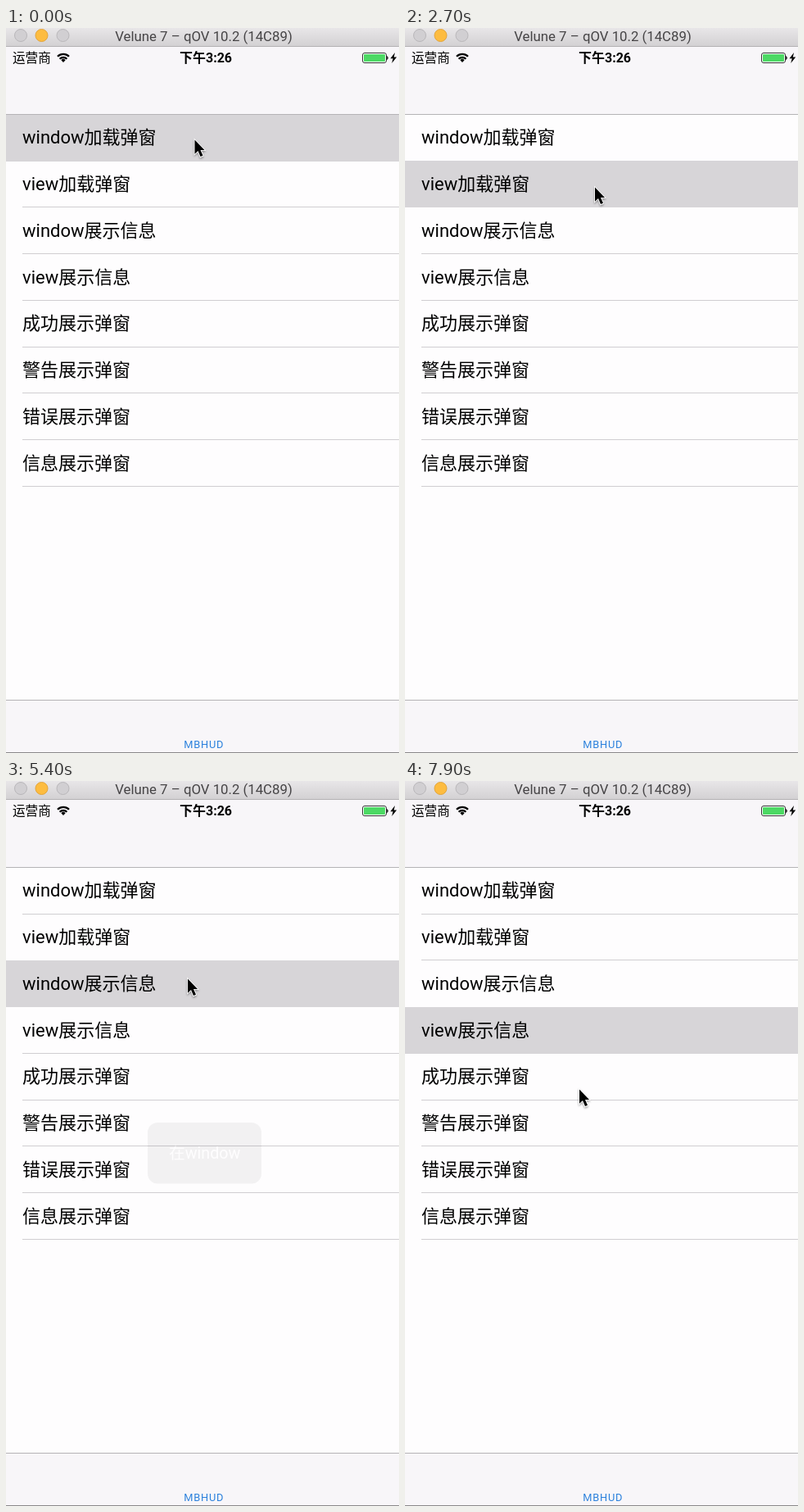
An HTML page that plays this animation: 480x885 px, repeating every 8000 ms.

```html
<!DOCTYPE html>
<html lang="zh-CN">
<head>
<meta charset="utf-8">
<title>HUD demo</title>
<style>
  html, body { margin: 0; width: 100%; height: 100%; overflow: hidden; background: #fefdfe; }
  svg { display: block; width: 480px; height: 885px; font-family: Roboto, "Noto Sans CJK SC", sans-serif; }
  .mid { text-anchor: middle; }
  .edge { stroke: #b5b3b6; }
  #rows text { font-size: 22px; }
  #rows line { stroke: #d0ced1; }
  .hud { fill: #fff; font-size: 20px; }
  .hud rect { fill: #000; fill-opacity: .8; }
</style>
</head>
<body>
<svg viewBox="0 0 480 885">
  <defs>
    <linearGradient id="chrome" x2="0" y2="1">
      <stop stop-color="#e8e6e8"/><stop offset="1" stop-color="#d2d0d2"/>
    </linearGradient>
    <filter id="shadow" x="-50%" y="-50%" width="200%" height="200%">
      <feDropShadow dx="0" dy="1.5" stdDeviation="1.2" flood-opacity=".4"/>
    </filter>
  </defs>
  <rect width="480" height="885" fill="#fefdfe"/>
  <rect y="22" width="480" height="83" fill="#f8f6f9"/>
  <rect y="820" width="480" height="65" fill="#f8f6f9"/>
  <path class="edge" d="M0 105.5H480M0 820.5H480"/>
  <path d="M0 884.5H480" stroke="#8a888a"/>

  <rect width="480" height="23" fill="url(#chrome)"/>
  <path d="M0 22.5H480" stroke="#b4b2b4"/>
  <g fill="#d1cfd2" stroke="#b9b7ba">
    <circle cx="18" cy="9" r="7.5"/>
    <circle cx="43.5" cy="9" r="7.5" fill="#fdbc40" stroke="#e2a43a"/>
    <circle cx="69.5" cy="9" r="7.5"/>
  </g>
  <text class="mid" x="241.5" y="15.5" font-size="16.8" fill="#464446">Velune 7 – qOV 10.2 (14C89)</text>

  <text x="8" y="42.3" font-size="15.6">运营商</text>
  <g fill="none" stroke="#000" stroke-width="2.3">
    <path d="M63 34.8a10 10 0 0 1 14 0M65.6 37.8a6.3 6.3 0 0 1 8.8 0"/>
    <path d="M70 42l-2.6-2.8a3.6 3.6 0 0 1 5.2 0Z" fill="#000" stroke="none"/>
  </g>
  <text class="mid" x="244" y="42.3" font-size="16" font-weight="600">下午3:26</text>
  <rect x="435.5" y="30.5" width="29" height="12" rx="2.5" fill="#fff" stroke="#333"/>
  <rect x="437" y="32" width="26" height="9" rx="1" fill="#4cd964"/>
  <path d="M465.5 34.5q2 2 0 4Z" fill="#333" stroke="#333"/>
  <path d="M475 30l-5.5 7.2h3.2L471.2 43l6-7.6h-3.4Z"/>

  <g id="rows"><rect id="selected" width="480" height="57" fill="#d7d5d8"/></g>
  <text class="mid" x="241.7" y="879" font-size="12.8" letter-spacing=".8" fill="#2a80dc">MBHUD</text>

  <g class="hud" id="loading">
    <rect x="173" y="389.5" width="138" height="128" rx="12"/>
    <g id="spinner" transform="translate(242 439)" stroke="#fff" stroke-width="4" stroke-linecap="round"/>
    <text class="mid" x="242" y="487">加载中.....</text>
  </g>
  <g class="hud" id="message">
    <rect x="173" y="417" width="139" height="74.5" rx="12"/>
    <text class="mid" x="242.7" y="461.3" font-size="19.7">在window</text>
  </g>

  <path id="cursor" d="M0 0V17.2L4 13.5L7 20.6L10 19.3L7 12.4H12Z" stroke="#fff" stroke-width="1.6"
        paint-order="stroke" filter="url(#shadow)"/>
</svg>
<script>
const LOOP = 8000, PITCH = 56.75, SPOKES = 12;
const $ = id => document.getElementById(id);

function add(parent, tag, attrs, text = '') {
  const el = document.createElementNS('http://www.w3.org/2000/svg', tag);
  for (const key in attrs) el.setAttribute(key, attrs[key]);
  el.textContent = text;
  return parent.appendChild(el);
}

const titles = ['window加载弹窗', 'view加载弹窗', 'window展示信息', 'view展示信息',
  '成功展示弹窗', '警告展示弹窗', '错误展示弹窗', '信息展示弹窗'];
const lines = titles.map((title, i) => {
  add($('rows'), 'text', { x: 20, y: 141.3 + i * PITCH }, title);
  const y = Math.floor(162 + i * PITCH) + .5;
  return add($('rows'), 'line', { x1: 20, x2: 480, y1: y, y2: y });
});
const spokes = Array.from({ length: SPOKES }, (_, i) =>
  add($('spinner'), 'line', { y1: -13.5, y2: -20.8, transform: `rotate(${i * 360 / SPOKES})` }));

const taps = [0, 2700, 5300, 6900];
// start, end, x, y of the pointer after each move
const moves = [
  [900, 1500, 232, 194.5],
  [3700, 4400, 222, 241.5],
  [5700, 6300, 211.5, 301],
  [7300, 7900, 213, 376.5],
];

function ease(t, start, end) {
  const p = Math.min(1, Math.max(0, (t - start) / (end - start)));
  return p * p * (3 - 2 * p);
}
const visible = (t, start, end) => ease(t, start, start + 300) - ease(t, end - 300, end);

function draw(t) {
  const row = taps.filter(tap => t >= tap).length - 1;
  $('selected').setAttribute('y', Math.round(105.7 + row * PITCH));
  lines.forEach((line, i) => line.setAttribute('opacity', i === row || i === row - 1 ? 0 : 1));

  $('loading').setAttribute('opacity', visible(t, 50, 2500) + visible(t, 2750, 5100));
  $('message').setAttribute('opacity', visible(t, 5358, 6700));

  const [time, phase] = t < 2700 ? [1700, 5.5] : [4800, 10.5];
  const head = Math.floor((t - time) * SPOKES / 1000 + phase) + 10 * SPOKES;
  spokes.forEach((spoke, i) => {
    const age = (head - i) % SPOKES;
    spoke.setAttribute('opacity', Math.max(.3, .9 - age * .075));
  });

  let x = 230.5, y = 136.5;
  for (const [start, end, toX, toY] of moves) {
    const p = ease(t, start, end);
    x += (toX - x) * p;
    y += (toY - y) * p;
  }
  $('cursor').setAttribute('transform', `translate(${x} ${y})`);
}

function tick() {
  draw(performance.now() % LOOP);
  requestAnimationFrame(tick);
}
tick();
</script>
</body>
</html>
```
